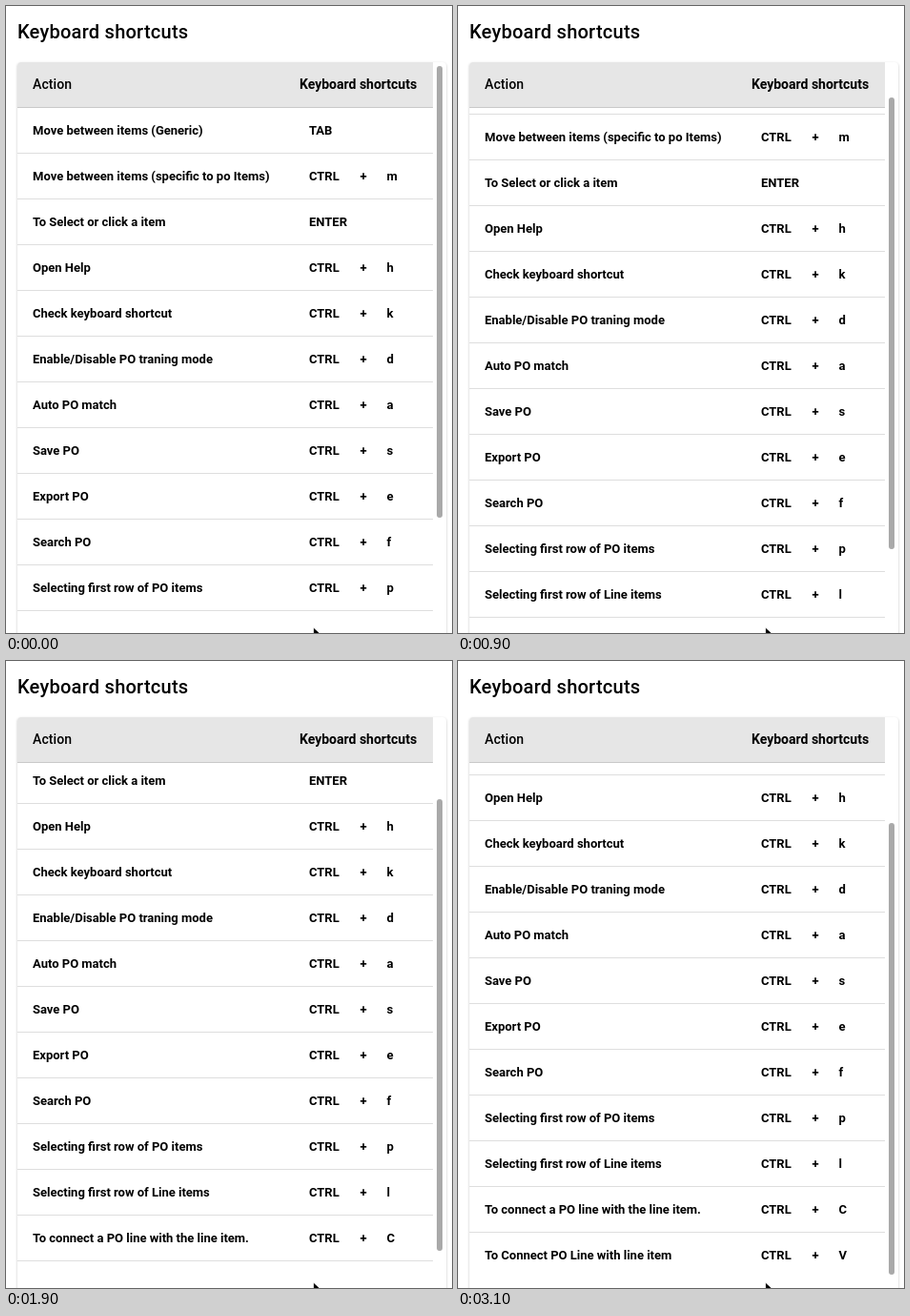
Write an HTML page that moves like this. It is 468 by 658 pixels and loops after 3200 ms.

```html
<!DOCTYPE html>
<html lang="en">
<head>
<meta charset="utf-8">
<title>Keyboard shortcuts</title>
<style>
html, body { margin: 0; width: 100%; height: 100%; overflow: hidden; background: #fff; }
body { position: relative; font-family: Roboto, sans-serif; color: #000; }
h1, .card, .head, .view, .thumb, svg, span { position: absolute; }
h1 { left: 12px; top: 15px; margin: 0; font: 500 20px/24px Roboto, sans-serif; letter-spacing: .25px; white-space: nowrap; }
.card {
  left: 12px; top: 59px; width: 450px; height: 620px; border-radius: 4px; background: #fff;
  box-shadow: 0 2px 1px -1px rgba(0,0,0,.2), 0 1px 1px rgba(0,0,0,.14), 0 1px 3px rgba(0,0,0,.2);
}
.head {
  width: 436px; height: 47px; background: #e6e6e6; border-bottom: 1px solid #c9c9c9;
  border-radius: 4px 0 0 0; font: 500 14px/47px Roboto, sans-serif; letter-spacing: .1px;
}
.head .keys { left: 296px; font-weight: 700; letter-spacing: 0; }
.view { top: 48px; width: 436px; height: 541px; overflow: hidden; }
.row { position: relative; height: 47px; border-bottom: 1px solid #dedede; font: 700 13px/47px Roboto, sans-serif; }
.row:last-child { border-color: transparent; }
span { left: 16px; white-space: nowrap; }
.row .keys { left: 306px; }
.row .plus { left: 359.5px; }
.row .letter { left: 387.5px; }
.thumb { left: 440px; top: 4px; width: 6px; height: 474px; border-radius: 3px; background: #a9a9a9; }
svg { left: 0; top: 0; }
</style>
</head>
<body>
<h1>Keyboard shortcuts</h1>
<div class="card">
  <div class="head"><span>Action</span><span class="keys">Keyboard shortcuts</span></div>
  <div class="view"><div id="rows"></div></div>
  <div class="thumb" id="thumb"></div>
</div>
<svg width="468" height="658">
  <path d="M322.5 652v17l4-4 3 6 3-1-3-6h6z" stroke="#fff" stroke-width=".8"/>
</svg>
<script>
const shortcuts = [
  ['Move between items (Generic)', 'TAB'],
  ['Move between items (specific to po Items)', 'CTRL', 'm'],
  ['To Select or click a item', 'ENTER'],
  ['Open Help', 'CTRL', 'h'],
  ['Check keyboard shortcut', 'CTRL', 'k'],
  ['Enable/Disable PO traning mode', 'CTRL', 'd'],
  ['Auto PO match', 'CTRL', 'a'],
  ['Save PO', 'CTRL', 's'],
  ['Export PO', 'CTRL', 'e'],
  ['Search PO', 'CTRL', 'f'],
  ['Selecting first row of PO items', 'CTRL', 'p'],
  ['Selecting first row of Line items', 'CTRL', 'l'],
  ['To connect a PO line with the line item.', 'CTRL', 'C'],
  ['To Connect PO Line with line item', 'CTRL', 'V']
];
const rows = document.getElementById('rows');
const thumb = document.getElementById('thumb');

rows.innerHTML = shortcuts.map(([action, key, letter]) =>
  `<div class="row"><span>${action}</span><span class="keys">${key}</span>` +
  (letter ? `<span class="plus">+</span><span class="letter">${letter}</span>` : '') +
  '</div>').join('');

// Scroll offset at each 100 ms tick; the last value holds to the end of the loop.
const TICK = 100, LOOP = 3200, MAX = 131, TRAVEL = 107;
const offsets = [0, 1, 2, 3, 5, 7, 9, 17, 28, 41, 62, 84, 92, 92, 92, 92, 92, 94, 97, 101, 111, 122, MAX];

const start = performance.now();
function draw() {
  const tick = Math.floor((performance.now() - start) % LOOP / TICK);
  const y = offsets[Math.min(tick, offsets.length - 1)];
  rows.style.transform = `translateY(${-y}px)`;
  thumb.style.transform = `translateY(${Math.round(y * TRAVEL / MAX)}px)`;
  requestAnimationFrame(draw);
}
draw();
</script>
</body>
</html>
```
